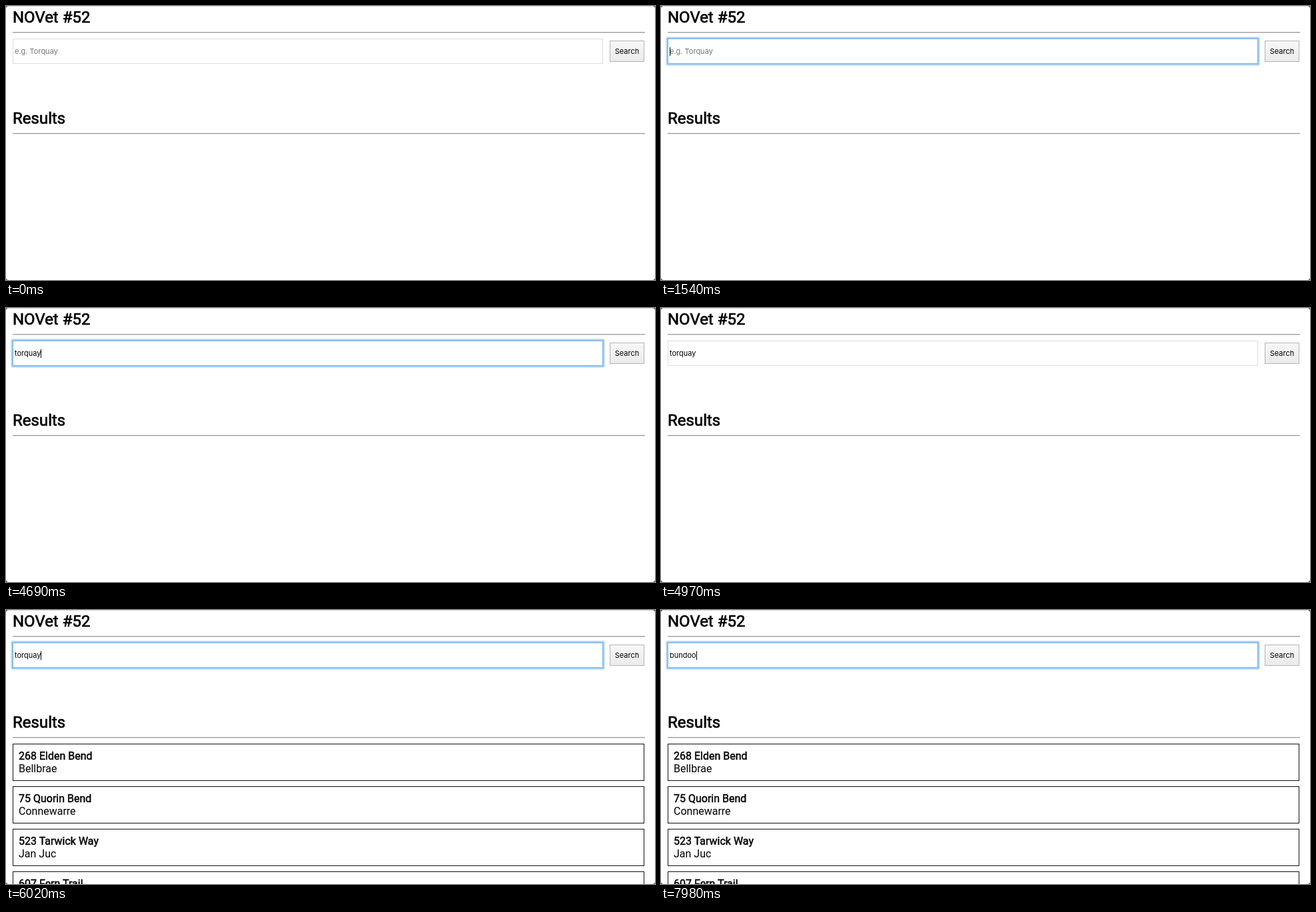
These frames come from a looping animation (974 by 412 pixels, 8000 ms). An HTML page:

```html
<!DOCTYPE html>
<html lang="en">
<head>
<meta charset="utf-8">
<title>Property search</title>
<style>
  * { box-sizing: border-box; }
  html, body { margin: 0; width: 100%; height: 100%; overflow: hidden; background: #444; }
  #stage {
    position: absolute; left: 0; top: 0; width: 974px; height: 412px;
    overflow: hidden; background: #fff; border-radius: 4px;
    border-top: 1px solid #d4d4d4;
    font: 16px/19px Roboto, sans-serif; color: #000;
  }
  #page { position: absolute; left: 0; top: -1px; width: 974px; height: 412px; }
  #page > * { position: absolute; }
  h2 {
    left: 10px; margin: 0; white-space: nowrap;
    font-size: 24px; line-height: 28px; font-weight: 400;
    -webkit-text-stroke: .7px #000;
  }
  .rule { left: 10px; width: 949px; height: 2px; background: #dcdcdc; border-top: 1px solid #9a9a9a; }
  #field, #button { font: 11px/13px Inter, sans-serif; white-space: pre; }
  #field {
    left: 10px; top: 49px; width: 886px; height: 38px;
    padding: 12px 2px; border: 1px solid #dcdcdc; background: #fff;
  }
  #field.focus { border-color: #82b6ec; box-shadow: 0 0 2px 2px #8fc0f2; }
  #field.hint #text { color: #757575; }
  #text { display: inline-block; height: 13px; }
  #field.picked #text { background: #b3d7ff; }
  #caret { position: absolute; top: 12px; width: 1px; height: 13px; background: #000; }
  #button {
    left: 906px; top: 52px; width: 52px; height: 32px;
    border: 1px solid #b4b4b4; background: linear-gradient(#f7f7f7, #ebebeb);
    text-align: center; line-height: 30px;
  }
  #list { left: 10px; top: 201px; width: 948px; }
  .card { height: 56px; margin-bottom: 8px; padding: 8px; border: 1px solid #111; white-space: nowrap; }
  .card b { display: block; font-weight: 400; -webkit-text-stroke: .45px #000; }
</style>
</head>
<body>
<div id="stage"><div id="page">
  <h2 style="top:3px">NOVet #52</h2>
  <div class="rule" style="top:39px"></div>
  <div id="field"><span id="text"></span><i id="caret"></i></div>
  <div id="button">Search</div>
  <h2 style="top:155px">Results</h2>
  <div class="rule" style="top:191px"></div>
  <div id="list">
    <div class="card"><b>268 Elden Bend</b>Bellbrae</div>
    <div class="card"><b>75 Quorin Bend</b>Connewarre</div>
    <div class="card"><b>523 Tarwick Way</b>Jan Juc</div>
    <div class="card"><b>607 Fern Trail</b>Torquay</div>
  </div>
</div></div>
<script>
  const LOOP = 8000, RESULTS_AT = 5180;
  const $ = id => document.getElementById(id);
  const field = $('field'), text = $('text'), caret = $('caret'), list = $('list');

  // [start ms, value, state]; states: blur, on / off (caret), picked
  const steps = [
    [0, '', 'blur'], [1540, '', 'on'], [2030, '', 'off'],
    [2380, 't', 'on'], [2520, 'to', 'on'], [2730, 'tor', 'on'],
    [3220, 'torq', 'on'], [3360, 'torqu', 'on'], [3500, 'torqua', 'on'],
    [3640, 'torquay', 'on'], [4130, 'torquay', 'off'], [4690, 'torquay', 'on'],
    [4970, 'torquay', 'blur'], [6020, 'torquay', 'on'], [6160, 'torquay', 'picked'],
    [7280, 'b', 'on'], [7420, 'bu', 'on'], [7560, 'bun', 'on'],
    [7700, 'bund', 'on'], [7840, 'bundo', 'on'], [7980, 'bundoo', 'on']
  ];

  function draw(now) {
    const t = now % LOOP;
    const [, value, state] = steps.filter(s => s[0] <= t).pop();
    text.textContent = value || 'e.g. Torquay';
    field.classList.toggle('hint', !value);
    field.classList.toggle('focus', state !== 'blur');
    field.classList.toggle('picked', state === 'picked');
    caret.style.visibility = state === 'on' ? 'visible' : 'hidden';
    caret.style.left = 2 + (value ? Math.round(text.offsetWidth) : 0) + 'px';
    list.style.visibility = t >= RESULTS_AT ? 'visible' : 'hidden';
  }

  const start = performance.now();
  function tick() {
    draw(performance.now() - start);
    requestAnimationFrame(tick);
  }
  tick();
</script>
</body>
</html>
```
